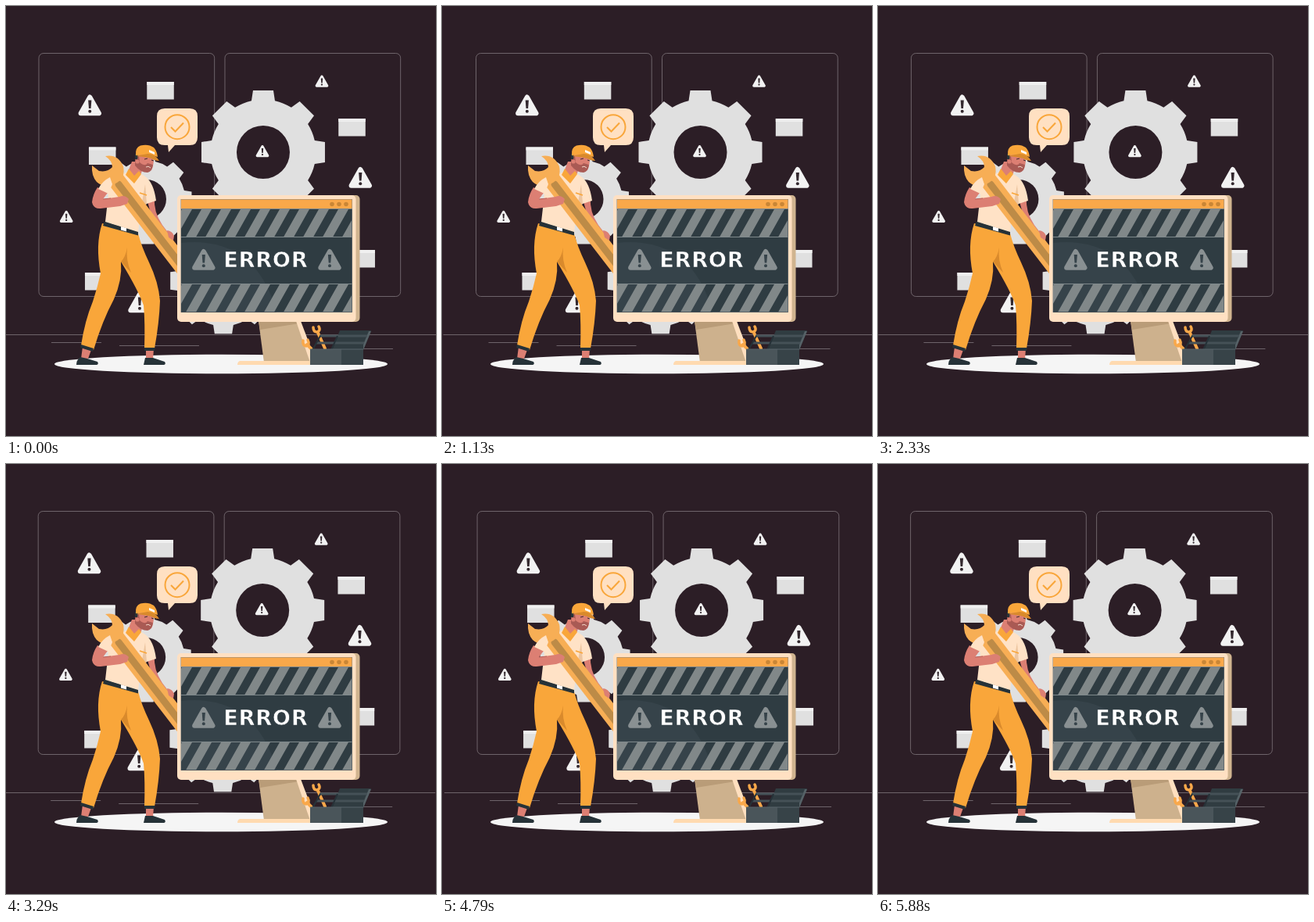
Write an HTML page that moves like this. It is 550 px wide and 550 px high and loops after 5930 ms.

```html
<!DOCTYPE html>
<html lang="en">
<head>
<meta charset="utf-8">
<title>Error</title>
<style>
html, body { margin: 0; width: 100%; height: 100%; overflow: hidden; background: #2c1e26; }
svg { display: block; width: 100vw; height: 100vh; }
text { font: bold 27.4px "DejaVu Sans", sans-serif; letter-spacing: .6px; fill: #fff; stroke: #323f45; stroke-width: .7; }
.line { fill: none; stroke: #776c72; stroke-width: .9; }
.pale { color: #f2f2f2; --mark: #33282e; }
.dim { color: #899092; --mark: #36434a; }
.skin { fill: #dc7f73; }
.dark { fill: #263238; }
.orange { fill: #f9a63a; }
.shirt { fill: #ffe2c6; }
</style>
</head>
<body>
<svg viewBox="0 0 550 550">
  <defs>
    <g id="warn">
      <path d="M0-10.5 11.7 10.3H-11.7Z" fill="currentColor" stroke="currentColor" stroke-width="6" stroke-linejoin="round"/>
      <path d="M-2.1-6.5H2.1L1.3 4H-1.3Z" fill="var(--mark)"/>
      <circle cy="7.7" r="2" fill="var(--mark)"/>
    </g>
    <g id="box">
      <path d="M0 0H34.5V22.5H0Z" fill="#e0e0e0"/>
      <path d="M0 0H34.5V4H0Z" fill="#f0f0f0"/>
    </g>
    <clipPath id="screen"><path d="M224 260H442.500V391.500H224Z"/></clipPath>
    <clipPath id="bands"><path d="M224 260H442.500V295H224ZM224 356H442.500V391.500H224Z"/></clipPath>
  </defs>

  <g id="back">
    <g class="line">
      <rect x="42" y="60.500" width="224.700" height="311" rx="6"/>
      <rect x="280" y="60.500" width="224.700" height="311" rx="6"/>
      <path d="M0 420.500H550M58 430.500H122M145 434.500H247M440 438.500H495"/>
    </g>
    <path id="gears" fill="#e0e0e0" fill-rule="evenodd"/>
    <use href="#box" x="180.300" y="97"/>
    <use href="#box" x="106" y="180.500"/>
    <use href="#box" x="425.300" y="144"/>
    <use href="#box" x="437.500" y="312"/>
    <use href="#box" x="101" y="341"/>
    <g class="pale">
      <use href="#warn" transform="translate(107.300 127)"/>
      <use href="#warn" transform="translate(453.300 219.500)"/>
      <use href="#warn" transform="translate(171 379)"/>
      <use href="#warn" transform="translate(404 96.200) scale(.57)"/>
      <use href="#warn" transform="translate(77.200 269.500) scale(.57)"/>
      <use href="#warn" transform="translate(328 185.700) scale(.57)"/>
    </g>
  </g>

  <ellipse cx="275" cy="458" rx="213" ry="12.300" fill="#f5f5f5"/>

  <g id="bubble">
    <path d="M203 131H235Q245 131 245 141V168Q245 178 235 178H216L208 187 207 178H203Q193 178 193 168V141Q193 131 203 131Z" fill="#ffe0c2"/>
    <g fill="none" stroke="#f9a63a" stroke-width="2">
      <circle cx="219" cy="154.700" r="15.500"/>
      <path d="M211 155 216.500 160.500 227 149.500"/>
    </g>
  </g>

  <g id="man">
    <path class="skin" d="M98 436 109 440 105 451H96ZM179 438H189L188 452H179Z"/>
    <path class="dark" d="M95 449 104 451 117 455Q119 458 116 459H90Q90 453 95 449ZM178 450H188L203 455Q205 458 202 459H176Z"/>
    <path class="orange" d="M123 278 169 291Q173 307 183 328 195 353 197 377 196 405 190 438H177Q178 405 176 383 170 365 147 327 149 350 138 375 123 403 112 440L96 434Q101 402 111 378 117 360 121 342 114 305 123 278Z"/>
    <path d="M147 327Q153 321 155 309 153 325 160 341Z" fill="#d98a2c"/>
    <path class="dark" d="M96 433 112 438 111 442 95 437ZM177 437H190.500L190 441H177ZM126 275.500 169 288V293.500L124 281Z"/>
    <path d="M147 282 154 284V288.500L147 286.500Z" fill="#fff"/>
    <!-- far arm -->
    <path class="skin" d="M181 248 190 248Q189 268 206 288L213 294 207 299 198 289Q184 270 181 248Z"/>
    <path class="shirt" d="M156 212Q147 216 133 219 123 224 118 235L131 241 127 276 169 289 173 257 180 253 192 249Q189 226 178 218L168 212Z"/>
    <path d="M173 257 180 253 178 228Z" fill="#ecc5a0"/>
    <path d="M171 239 180 242" stroke="#f9a63a" stroke-width="1.500"/>
    <path class="skin" d="M161 199H177L173 214 165 221 156 212Z"/>
    <path class="orange" d="M157 208 153 216 164 227 173 215 170 211 164 217Z"/>
    <!-- head -->
    <path class="skin" d="M167 188H187Q191 200 186 210 179 214 170 209 162 204 167 188Z"/>
    <path d="M165 193 170 192 171 200Q178 206 181 201L188 203Q187 212 181 213 172 213 165 204Z" fill="#a95a54"/>
    <path d="M179 206Q182 204 185 207" fill="none" stroke="#f3d7ca"/>
    <path class="dark" d="M165 189H169L168 196H165Z"/>
    <path d="M177 196 181 195M186 197 189 198" stroke="#3b272b"/>
    <circle class="skin" cx="168" cy="199" r="2.600"/>
    <path class="orange" d="M166 191Q165 181 172 178.500 182 176 189 181 193 185 194 193L181 190Z"/>
    <path d="M181 189Q191 189 196 198 190 198 186 195 178 193 166 192Z" fill="#d98a2c"/>
    <path d="M183 184 190 187V190L183 187Z" fill="#fff"/>
    <!-- wrench -->
    <path d="M138 219 232 341" stroke="#f7ae55" stroke-width="22"/>
    <path d="M144 228 232 342" stroke="#bd8b47" stroke-width="9" stroke-linecap="round"/>
    <path d="M127 192Q143 189 150 205 153 219 142 226 127 235 116 225 109 217 110 204L119 211Q130 213 136 206 136 198 127 192Z" fill="#f7ae55"/>
    <!-- near arm and hands -->
    <path class="skin" d="M117 232 130 239 124 247 145 244Q152 241 157 247L155 253 146 256 121 259Q112 260 110 251 111 241 117 232ZM206 287Q213 288 215 294L214 300 208 296Z"/>
    <path d="M124 247 134 246" stroke="#b95f59"/>
    <path class="shirt" d="M133 219Q123 224 118 234L131 240 136 228Z"/>
  </g>

  <g id="monitor">
    <path d="M323 403H374L391 456H330Z" fill="#cdb18d"/>
    <path d="M323 403H373L375 406 325 414Z" fill="#b99c78"/>
    <path d="M371 403H377L397 456H389Z" fill="#ffdfbf"/>
    <path d="M299 454H391V459H296Q296 455 299 454Z" fill="#ffdab0"/>
    <rect x="230" y="242" width="222.500" height="162" rx="5" fill="#d0b48f"/>
    <rect x="219" y="242" width="228.500" height="162" rx="5" fill="#ffe0c2"/>
    <path d="M223.500 247H443V392H223.500Z" fill="#7f8688"/>
    <path d="M224 247.500H442.500V259H224Z" fill="#f9a84a"/>
    <g fill="#c98636"><circle cx="417" cy="253.500" r="2.800"/><circle cx="426" cy="253.500" r="2.800"/><circle cx="435" cy="253.500" r="2.800"/></g>
    <g clip-path="url(#screen)">
      <path d="M224 260H443V392H224Z" fill="#2f3c42"/>
      <path d="M224 303Q270 298 303 320 334 345 346 392H224Z" fill="#36434a"/>
      <path id="stripes" clip-path="url(#bands)" fill="#818889"/>
      <path d="M224 295.500H443M224 355.500H443" stroke="#7f898c" stroke-width="1.200"/>
    </g>
    <g class="dim">
      <use href="#warn" transform="translate(252.800 324.500)"/>
      <use href="#warn" transform="translate(414 324.500)"/>
    </g>
    <text x="332.300" y="334" text-anchor="middle">ERROR</text>
  </g>

  <g id="toolbox">
    <g fill="none" stroke="#f9a84a" stroke-linecap="round">
      <path d="M399 418 408 438M385 433 393 441" stroke-width="4"/>
      <path d="M393 411Q393 417 398 417 403 415 400 410M380 428Q379 434 384 435 389 433 386 427" stroke-width="3.500"/>
    </g>
    <path d="M427 415H467L457 440H417Z" fill="#303c41"/>
    <path d="M464 416H467L457 440V433Z" fill="#566267"/>
    <path d="M401 422H462M397 431H458" stroke="#455157" stroke-width="3"/>
    <path d="M402 422 392 440M424 422 416 440" stroke="#263238" stroke-width="2"/>
    <path d="M389 439H457V459H389Z" fill="#4a555a"/>
    <path d="M429 439H457V459H429Z" fill="#374348"/>
    <path d="M389 439H457" stroke="#58656a"/>
  </g>
</svg>
<script>
const $ = id => document.getElementById(id);

// Eight-toothed gear with an optional round hole
function gear(cx, cy, R, hole) {
  const k = R / 79, r = 67.5 * k, foot = Math.sqrt(r * r - 225 * k * k);
  let d = '';
  for (let i = 0; i < 8; i++) {
    const c = Math.cos(i * Math.PI / 4), s = Math.sin(i * Math.PI / 4);
    const at = (x, y) => `${cx + x * c - y * s} ${cy + x * s + y * c} `;
    d += (i ? `A${r} ${r} 0 0 1 ` : 'M') + at(foot, -15 * k) +
      'L' + at(R, -13 * k) + at(R, 13 * k) + at(foot, 15 * k);
  }
  d += `A${r} ${r} 0 0 1 ${cx + foot} ${cy - 15 * k}Z`;
  if (hole) d += `M${cx - hole} ${cy}a${hole} ${hole} 0 1 0 ${2 * hole} 0a${hole} ${hole} 0 1 0 ${-2 * hole} 0Z`;
  return d;
}
$('gears').setAttribute('d', gear(329, 187, 79, 34) + gear(180, 247, 57.5, 25) + gear(278, 351.5, 67.8));

let stripes = '';
for (let i = -1; i < 9; i++)
  for (const y of [260, 356]) stripes += `M${250 + 25 * i} ${y}h13l-20 35.500h-13Z`;
$('stripes').setAttribute('d', stripes);

// Sideways shake: one key position per tenth of the 3 s cycle
const LOOP = 5930, CYCLE = 3000, FRAME = 1000 / 24;
const keys = [0, -1, 2, -4, 4, -4, 4, -4, 2, -1, 0];
function shake(ms) {
  const p = (ms + CYCLE) % CYCLE / CYCLE * 10, i = Math.floor(p);
  return .87 * (keys[i] + (keys[i + 1] - keys[i]) * (p - i));
}
const start = performance.now();
function draw() {
  const t = (performance.now() - start) % LOOP;
  const step = Math.floor((t + 5) / FRAME) * FRAME;
  $('back').setAttribute('transform', `translate(${shake(step - 10).toFixed(2)} 0)`);
  requestAnimationFrame(draw);
}
draw();
</script>
</body>
</html>
```
